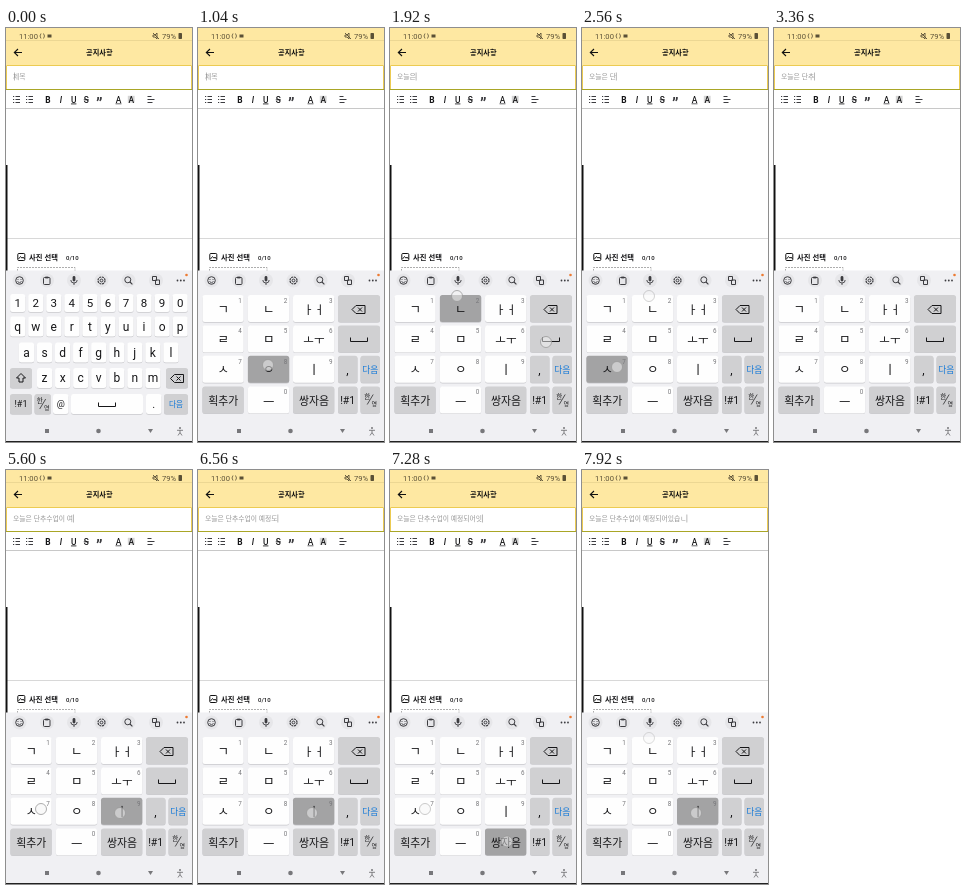
Recreate the animation shown at these times as an HTML page. Size 186 by 414 pixels, loop 8000 ms.

```html
<!DOCTYPE html>
<html lang="ko">
<head>
<meta charset="utf-8">
<style>
html, body { margin: 0; width: 100%; height: 100%; overflow: hidden; background: #fff; }
svg { display: block; width: 186px; height: 414px; }
text { font-family: "Noto Sans CJK KR", "Noto Sans CJK JP", "Noto Sans CJK", sans-serif; white-space: pre; }
.latin { font-family: Roboto, sans-serif; }
</style>
</head>
<body>
<svg id="stage" viewBox="0 0 186 414"></svg>
<script>
const LOOP = 8000, SWITCH_AT = 310, TOUCH_LIFE = 210;
const WHITE = '#fefefe', GREY = '#d0d0d2', PRESSED = '#a3a3a4', INK = '#161618', ICON = '#3c3c40', BLUE = '#1479d8';

const rect = (x, y, w, h, fill, extra = '') =>
  `<rect x="${x}" y="${y}" width="${w}" height="${h}" fill="${fill}" ${extra}/>`;
const line = (d, color = INK, width = 1, extra = '') =>
  `<path d="${d}" fill="none" stroke="${color}" stroke-width="${width}" ${extra}/>`;
const text = (s, x, y, size, { fill = INK, anchor = 'middle', weight = 400, latin = false, extra = '' } = {}) =>
  `<text x="${x}" y="${y}" font-size="${size}" fill="${fill}" text-anchor="${anchor}" font-weight="${weight}" ${latin ? 'class="latin"' : ''} ${extra}>${s}</text>`;
const keyBox = (x, y, w, h, fill, id = '') =>
  rect(x, y + .7, w, h, '#c9c9cd', 'rx="2.5"') + rect(x, y, w, h, fill, `rx="2.5" ${id && `data-key="${id}"`}`);

const backspace = (x, y) =>
  line(`M${x - 7} ${y}l4 -4h9v8h-9zM${x - 1} ${y - 2}l4 4m0 -4l-4 4`, INK, 1);
const spaceMark = (x, y, half) => line(`M${x - half} ${y - 2}v4h${half * 2}v-4`, INK, 1);
const languageMark = (x, y) =>
  text('한', x - 3, y - 1, 6.5) + text('영', x + 4, y + 6, 6) + line(`M${x - 3} ${y + 5}l6 -10`, INK, .7);

function header() {
  const status = '#5a5036';
  return rect(0, 0, 186, 37, '#fee8a2')
    + line('M0 12.5h186', '#ecd793')
    + text('11:00', 13, 10.8, 7.6, { anchor: 'start', fill: status, latin: true })
    + line('M35 5.5q-2 2.5 0 5M37.5 5.5q2 2.5 0 5', status, .8) + rect(41.5, 6.5, 4, 3, status)
    + line('M147 7h2l2 -2v6l-2 -2h-2zM147 5l6 6', status, .9)
    + text('79%', 156, 10.8, 7.6, { anchor: 'start', fill: status, latin: true })
    + rect(172.5, 5, 3.5, 6, status, 'rx=".7"')
    + line('M16 24.5H8.5M12 21L8.3 24.5l3.7 3.5', '#111', 1.1)
    + text('공지사항', 93.3, 26.7, 7.2, { weight: 700, fill: '#111' });
}

function editor() {
  const mark = (s, x, extra = '', weight = 500) => text(s, x, 74.5, 8.4, { latin: true, weight, extra });
  const rows = (x, w) => [68.5, 71.5, 74.5].map(y => `M${x} ${y}h${w}`).join('');
  return rect(0, 37, 186, 205, '#fff')
    + line('M.5 61V37.5h185V61', '#eccb52')
    + line('M0 61.5h186', '#a9a626')
    + line(rows(9.5, 4.5), ICON) + line(rows(7, 1.2), ICON)
    + line(rows(22.5, 4.5), ICON) + line(rows(20, 1.2), ICON)
    + mark('B', 42, '', 700) + mark('I', 55, 'font-style="italic"')
    + mark('U', 67.7, 'text-decoration="underline"') + mark('S', 80.3, 'text-decoration="line-through"')
    + text('”', 93.3, 80.5, 16, { latin: true, weight: 700, fill: ICON })
    + mark('A', 112.5) + line('M109.5 75.8h6', ICON, .8)
    + rect(121.8, 67.8, 6.8, 6.8, '#d4d4d4') + mark('A', 125.2)
    + line('M141.5 68.5h4M141.5 71.5h7M141.5 74.5h5', ICON)
    + line('M0 80.5h186', '#c8c8c8')
    + line('M0 210.5h186', '#d8d8d8')
    + rect(0, 137, 1.5, 106, '#111')
    + rect(11.8, 225.5, 7, 7, 'none', 'rx="1" stroke="#111"')
    + line('M12.5 231l2 -2.5 1.5 1.7 1 -1.2 1.5 2', '#111', .9)
    + text('사진 선택', 23, 232, 7.3, { anchor: 'start', weight: 700 })
    + text('0/10', 60, 231.5, 6, { anchor: 'start', weight: 500, latin: true })
    + line('M11.5 243v-3.5h57.5v3.5', '#999', .8, 'stroke-dasharray="2 1"');
}

function keyboardFrame() {
  const ring = (x, y, r, extra = '') => `<circle cx="${x}" cy="${y}" r="${r}" fill="none" stroke="${ICON}" ${extra}/>`;
  const disc = [13.5, 41, 68, 95.5, 122.5, 150]
    .map(x => `<circle cx="${x}" cy="252.5" r="7" fill="#e6e6e9"/>`).join('');
  return rect(0, 242.5, 186, 170.5, '#f0f0f3') + rect(0, 413, 186, 1, '#222') + disc
    + ring(13.5, 252.5, 3.8) + line('M11.5 253.5q2 2.5 4 0M12 251v.9M15 251v.9', ICON, .9)
    + rect(37.5, 249.5, 6.5, 7, 'none', `rx="1" stroke="${ICON}"`) + line('M39.3 249.5h3', ICON, 1.8)
    + rect(66.6, 248, 2.8, 5.5, ICON, 'rx="1.4"') + line('M64.8 252q0 3 3.2 3t3.2 -3M68 255v2', ICON, .9)
    + ring(95.5, 252.5, 3.5, 'stroke-width="1.2" stroke-dasharray="2 .75"') + ring(95.5, 252.5, 1.4)
    + ring(121.8, 251.8, 3) + line('M124 254l2.4 2.4', ICON, 1.1)
    + line('M146.5 248.5h4v4h-4zM149.5 252h4v4.5h-4z', ICON)
    + [171.5, 174.8, 178].map(x => `<circle cx="${x}" cy="252.5" r=".9" fill="${ICON}"/>`).join('')
    + '<circle cx="180.5" cy="247" r="1.3" fill="#ed7a31"/>'
    + rect(39, 401, 4, 4, '#77777a')
    + '<circle cx="92.5" cy="403" r="2.3" fill="#77777a"/><path d="M142 401h5l-2.5 4z" fill="#77777a"/>'
    + '<circle cx="174" cy="400" r="1" fill="#77777a"/>'
    + line('M171 402.3h6M174 402v2.5l-2 3M174 404.5l2 3', '#77777a', .9);
}

function qwerty() {
  const row = (chars, firstX, y, h, size) => [...chars].map((c, i) => {
    const x = firstX + i * 18.05;
    return keyBox(x - 7.6, y, 15.2, h, WHITE) + text(c, x, y + h / 2 + 4, size, { latin: true });
  }).join('');
  return row('1234567890', 11.7, 266, 18, 11.5)
    + row('qwertyuiop', 11.7, 288.5, 20, 12)
    + row('asdfghjkl', 20.5, 314.5, 20, 12)
    + row('zxcvbnm', 38.6, 340, 20, 12)
    + keyBox(4, 340, 22, 20, GREY) + line('M15 345.5l-4.5 4.5h2.5v4h4v-4h2.5z')
    + keyBox(160, 340, 22, 20, GREY) + backspace(171.5, 350.5)
    + keyBox(4, 366, 22, 20, GREY) + text('!#1', 15, 379.3, 9, { latin: true })
    + keyBox(28.5, 366, 16.5, 20, GREY) + languageMark(36.7, 376)
    + keyBox(47, 366, 15.5, 20, WHITE) + text('@', 54.7, 379, 9, { latin: true })
    + keyBox(65, 366, 72, 20, WHITE) + spaceMark(101, 376.5, 8.5)
    + keyBox(140, 366, 15.5, 20, WHITE) + text('.', 147.7, 380, 11, { latin: true })
    + keyBox(158, 366, 24, 20, GREY) + text('다음', 170, 379, 7.6, { fill: BLUE, weight: 500 });
}

const COLS = [4.4, 49.9, 95], ROWS = [267, 297.4, 327.8, 358.4], KEY_W = 41.3, KEY_H = 27;
const GRID = 'ㄱㄴㅏㄹㅁㅗㅅㅇㅣ획ㅡ쌍';
const LABELS = { ㅏ: 'ㅏㅓ', ㅗ: 'ㅗㅜ', 획: '획추가', 쌍: '쌍자음' };
const LABEL_SIZE = [12.5, 11.5, 10.9];
const restColor = id => '획쌍_'.includes(id) ? GREY : WHITE;

function hangul() {
  let out = [...GRID].map((id, i) => {
    const x = COLS[i % 3], y = ROWS[i / 3 | 0], label = LABELS[id] || id;
    const digit = i < 9 ? i + 1 : id === 'ㅡ' ? 0 : '';
    const baseline = y + (id === 'ㅡ' ? 21 : 18.6);
    return keyBox(x, y, KEY_W, KEY_H, restColor(id), id)
      + text(label, x + KEY_W / 2 + .3, baseline, LABEL_SIZE[label.length - 1])
      + text(digit, x + 37.7, y + 8, 6.3, { latin: true, fill: '#77777a' });
  }).join('');
  out += keyBox(140, ROWS[0], 42, KEY_H, GREY) + backspace(161, 281.5)
    + keyBox(140, ROWS[1], 42, KEY_H, GREY, '_') + spaceMark(161, 311.5, 8.5)
    + keyBox(140, ROWS[2], 19.5, KEY_H, GREY) + text(',', 149.5, 345.5, 12, { latin: true })
    + keyBox(162.5, ROWS[2], 19.5, KEY_H, GREY) + text('다음', 172.2, 345, 8.7, { fill: BLUE, weight: 500 })
    + keyBox(140, ROWS[3], 19.5, KEY_H, GREY) + text('!#1', 149.7, 376, 10.5, { latin: true })
    + keyBox(162.5, ROWS[3], 19.5, KEY_H, GREY) + languageMark(172.2, 371.5);
  return out;
}

// Each phrase: settled text, then "time key composing" per stroke
const PHRASES = [
  ['', '960ㅇㅇ 1080ㅗ오 1200ㄴ온 1320ㅡ오느 1440ㄹ오늘 1560ㅇ오늘ㅇ 1680ㅡ오늘으 1800ㄴ오늘은'],
  ['오늘은 ', '1905_ 2060ㄴㄴ 2180획ㄷ 2290ㅏ다 2400ㄴ단 2490ㅅ단ㅅ 2600획단ㅈ 2710획단ㅊ 2900ㅗ단초 3060ㅗ단추 '
    + '3640ㅅ단춧 3800ㅗ단추소 3940ㅗ단추수'],
  ['오늘은 단추', '4140ㅇ숭 4180ㅏ수아 4400ㅏ수어 4510ㅁ수엄 4640획수업 4760ㅇ수업ㅇ 4870ㅣ수업이'],
  ['오늘은 단추수업이 ', '4980_ 5070ㅇㅇ 5170ㅏ아 5270ㅏ어 5380획여 5490ㅣ예 5590ㅅ옛 5700획옞 5810ㅏ예자 5920ㅏ예저 6030ㅇ예정 '
    + '6140ㄴ예정ㄴ 6250획예정ㄷ 6345ㅗ예정도 6490ㅣ예정되'],
  ['오늘은 단추수업이 예정', '6640ㅇ됭 6740ㅏ되아 6840ㅏ되어 6940ㅇ되엉 7040ㅣ되어이 7130ㅅ되어잇 7220쌍되어있 '
    + '7320ㅅ되어있ㅅ 7420ㅡ되어있스 7520ㅁ되어있슴 7620획되어있습 7750ㄴ되어있습ㄴ 7840ㅣ되어있습니'],
];
const strokes = PHRASES.flatMap(([settled, list]) => list.split(' ').map(item => {
  const [, time, key, tail] = item.match(/^(\d+)(.)(.*)$/);
  return { time: +time, key, value: settled + tail };
}));
strokes.unshift({ time: 60, key: '한', value: '' });

const FINGER = { 한: [37, 372], _: [156, 314], ㄴ: [67, 268], ㅏ: [120, 279], ㅇ: [70, 337], ㅅ: [35, 339], ㅣ: [114, 343] };
const fingerAt = key => {
  const i = GRID.indexOf(key);
  return FINGER[key] || [COLS[i % 3] + 22, ROWS[i / 3 | 0] + 13];
};

const stage = document.getElementById('stage');
stage.innerHTML = header() + editor() + text('제목', 7, 50.8, 6.8, { anchor: 'start', extra: 'id="title"' })
  + rect(8, 44.5, .6, 8, '#8a8a8a', 'id="caret"') + keyboardFrame()
  + `<g id="qwerty">${qwerty()}</g><g id="hangul">${hangul()}</g><g id="touches"></g>`;
const [title, caret, latinKeys, koreanKeys, touches] =
  ['title', 'caret', 'qwerty', 'hangul', 'touches'].map(id => document.getElementById(id));
const keyNodes = [...koreanKeys.querySelectorAll('[data-key]')];

function showTitle(value) {
  const shown = value || '제목';
  if (title.textContent !== shown) title.textContent = shown;
  title.setAttribute('fill', value ? '#979797' : '#a0a0a0');
  caret.setAttribute('x', value ? 7 + title.getComputedTextLength() : 8);
}

function render(t) {
  const korean = t >= SWITCH_AT;
  latinKeys.style.display = korean ? 'none' : '';
  koreanKeys.style.display = korean ? '' : 'none';

  const typed = strokes.filter(s => t >= s.time + 120).pop();
  showTitle(typed ? typed.value : '');

  const held = strokes.filter(s => t >= s.time + 30 && t < s.time + 130).map(s => s.key);
  for (const node of keyNodes) {
    const id = node.dataset.key;
    node.setAttribute('fill', held.includes(id) ? PRESSED : restColor(id));
  }

  touches.innerHTML = strokes.filter(s => t >= s.time && t < s.time + TOUCH_LIFE).map(s => {
    const [x, y] = fingerAt(s.key);
    const opacity = Math.min(1, (TOUCH_LIFE - (t - s.time)) / 90);
    return `<circle cx="${x}" cy="${y}" r="5.5" fill="#f4f4f4" fill-opacity=".5" stroke="#9a9a9a" stroke-width=".8" opacity="${opacity}"/>`;
  }).join('');
}

const start = performance.now();
function tick() {
  render((performance.now() - start) % LOOP);
  requestAnimationFrame(tick);
}
tick();
</script>
</body>
</html>
```
